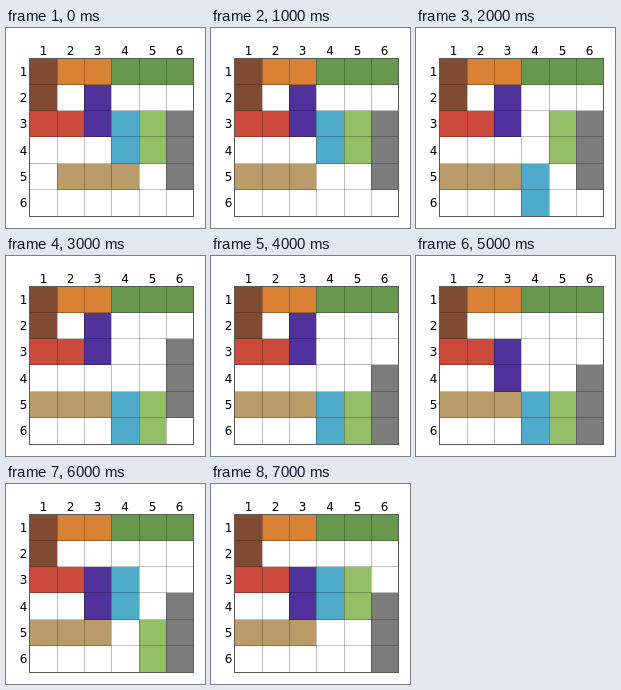
These frames come from a looping animation (199 px wide and 200 px high, 8 s). An HTML page:

```html
<!DOCTYPE html>
<html lang="en">
<head>
<meta charset="utf-8">
<title>Sliding blocks</title>
<style>
  html, body { margin: 0; width: 100%; height: 100%; overflow: hidden; background: #fff; }
  svg { display: block; width: 100vw; height: 100vh; }
  text { font: 12px "DejaVu Sans", sans-serif; text-anchor: middle; }
  .blocks { shape-rendering: crispEdges; }
  .grid { stroke: #000; stroke-opacity: .25; }
  .frame { fill: none; stroke: #000; stroke-opacity: .65; }
</style>
</head>
<body>
<svg viewBox="0 0 199 200"></svg>
<script>
const LOOP = 8000, STEP = 1000;
const X = [24, 51, 78, 105, 133, 160, 187];
const Y = [31, 57, 83, 109, 136, 162, 188];

// colour, column, row, columns wide, rows high
const blocks = [
  ['#7f4c33', 0, 0, 1, 2],
  ['#d98236', 1, 0, 2, 1],
  ['#67984e', 3, 0, 3, 1],
  ['#51319b', 2, 1, 1, 2],
  ['#cb4a3c', 0, 2, 2, 1],
  ['#50abca', 3, 2, 1, 2],
  ['#95be69', 4, 2, 1, 2],
  ['#7c7c7c', 5, 2, 1, 3],
  ['#b99c6a', 1, 4, 3, 1],
];

// one move per step: block, new column, new row
const moves = [
  [8, 0, 4],
  [5, 3, 4],
  [6, 4, 4],
  [7, 5, 3],
  [3, 2, 2],
  [5, 3, 2],
  [6, 4, 2],
];

const svg = document.querySelector('svg');

function add(parent, tag, attrs, text) {
  const el = document.createElementNS('http://www.w3.org/2000/svg', tag);
  for (const key in attrs) el.setAttribute(key, attrs[key]);
  if (text) el.textContent = text;
  return parent.appendChild(el);
}

const layer = add(svg, 'g', { class: 'blocks' });
const rects = blocks.map(([fill]) => add(layer, 'rect', { fill }));

const grid = add(svg, 'g', { class: 'grid' });
for (let i = 1; i < 6; i++) {
  add(grid, 'path', { d: `M${X[i] + .5} 31V188` });
  add(grid, 'path', { d: `M24 ${Y[i] - .5}H187` });
}
add(svg, 'rect', { class: 'frame', x: 23.5, y: 30.5, width: 164, height: 158 });

for (let i = 0; i < 6; i++) {
  add(svg, 'text', { x: (X[i] + X[i + 1]) / 2, y: 27 }, i + 1);
  add(svg, 'text', { x: 17.5, y: Math.round((Y[i] + Y[i + 1]) / 2) + 4 }, i + 1);
}

function place(i, col, row) {
  const [, , , w, h] = blocks[i], rect = rects[i];
  rect.setAttribute('x', X[col]);
  rect.setAttribute('y', Y[row]);
  rect.setAttribute('width', X[col + w] - X[col]);
  rect.setAttribute('height', Y[row + h] - Y[row]);
}

let shown = -1;
function draw(now) {
  const step = Math.floor(now % LOOP / STEP);
  if (step !== shown) {
    shown = step;
    blocks.forEach(([, col, row], i) => place(i, col, row));
    moves.slice(0, step).forEach(move => place(...move));
  }
}

const start = performance.now();
function tick() {
  draw(performance.now() - start);
  requestAnimationFrame(tick);
}
tick();
</script>
</body>
</html>
```
